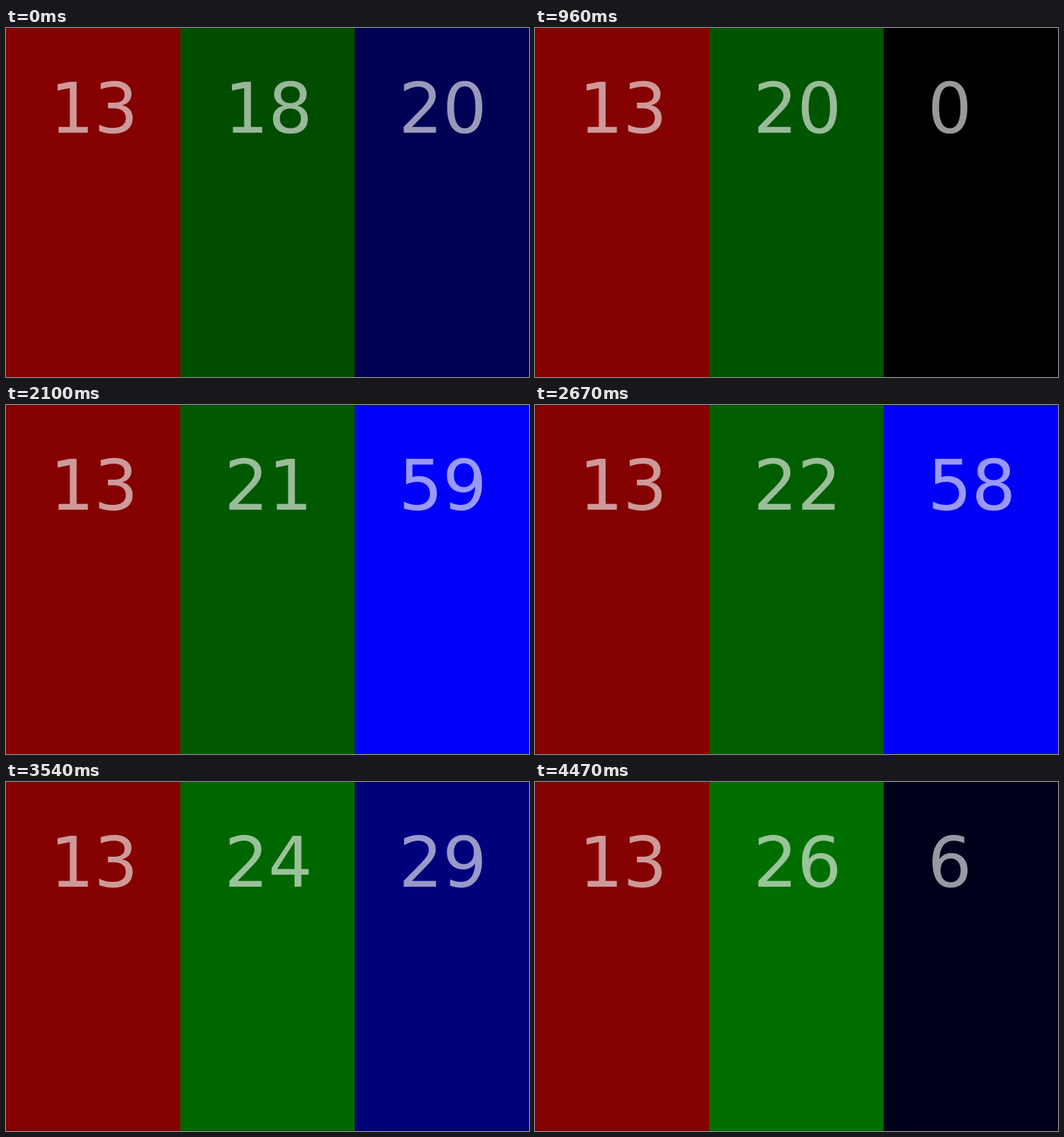
Recreate the animation shown at these times as an HTML page. Size 750 by 500 pixels, loop 4.5 s.

```html
<!DOCTYPE html>
<html>
<head>
<meta charset="utf-8">
<style>
  html, body { margin: 0; width: 100%; height: 100%; overflow: hidden; background: #000; }
  svg { display: block; width: 750px; height: 500px; }
  text { font: 100px "DejaVu Sans", sans-serif; letter-spacing: -0.5px; fill: #fff; fill-opacity: .6; text-rendering: geometricPrecision; }
</style>
</head>
<body>
<svg viewBox="0 0 750 500">
  <rect id="hourBar" width="250" height="500"/>
  <rect id="minBar" x="250" width="250" height="500"/>
  <rect id="secBar" x="500" width="250" height="500"/>
  <text id="hour" x="63" y="150"></text>
  <text id="min" x="313" y="150"></text>
  <text id="sec" x="563" y="150"></text>
</svg>
<script>
const LOOP = 4500, STEP = 30;
const RATE = 3.125;                              // clock seconds per step
const START = 13 * 3600 + 18 * 60 + 20.5;
const $ = id => document.getElementById(id);

function show(id, value, color) {
  $(id).textContent = value;
  $(id + "Bar").setAttribute("fill", `rgb(${color})`);
}

function draw(ms) {
  const step = Math.floor((ms % LOOP) / STEP);
  const now = Math.floor(START + step * RATE);
  const h = Math.floor(now / 3600), m = Math.floor(now / 60) % 60, s = now % 60;
  show("hour", h, [Math.round(h * 10.2), 0, 0]);
  show("min", m, [0, Math.round(m * 4.25), 0]);
  show("sec", s, [0, 0, Math.round(s * 4.25)]);
}

const t0 = performance.now();
function tick() {
  draw(performance.now() - t0);
  requestAnimationFrame(tick);
}
tick();
</script>
</body>
</html>
```
